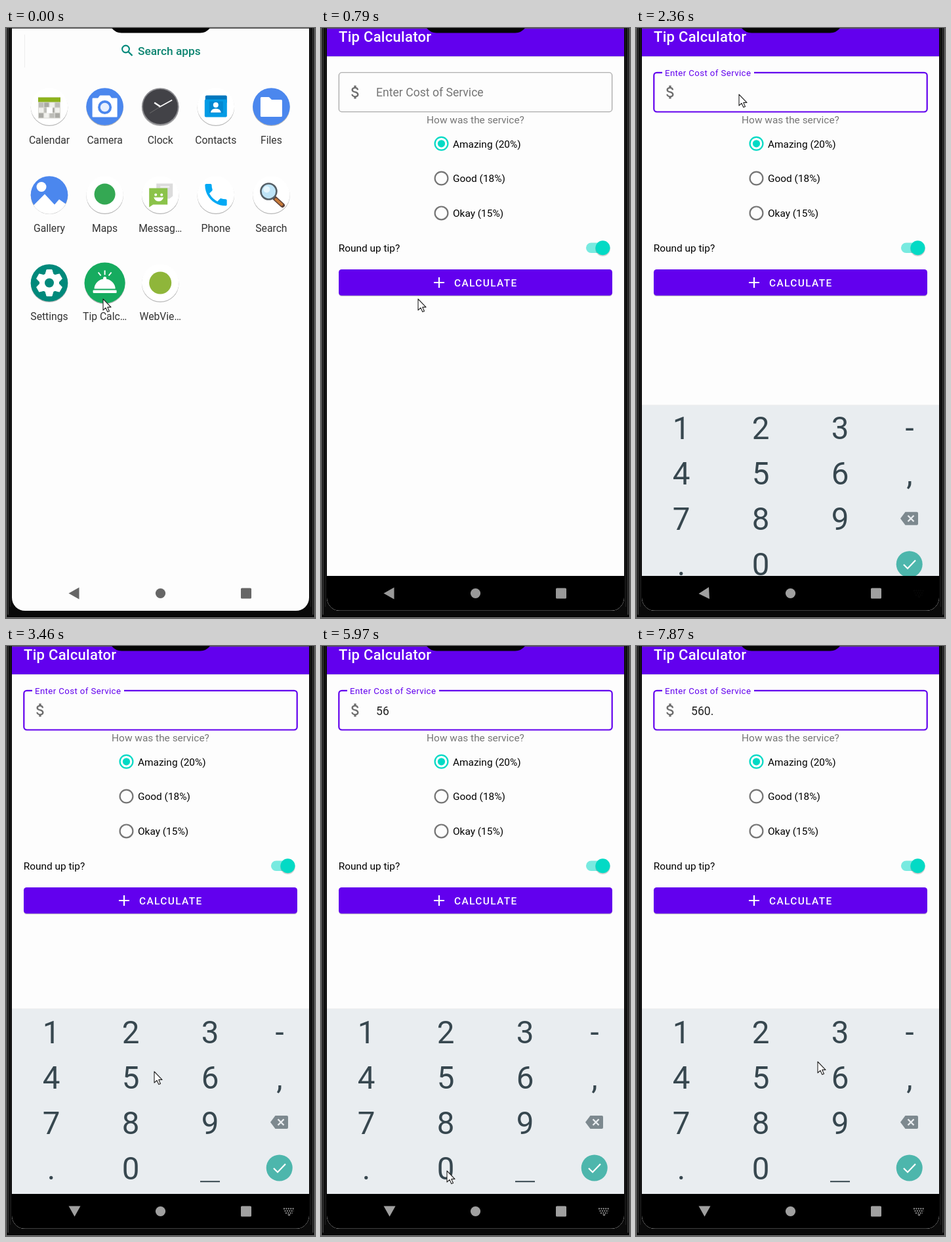
An HTML page that plays this animation: 471x897 px, repeating every 8 s.

```html
<!DOCTYPE html>
<html lang="en">
<head>
<meta charset="utf-8">
<title>Tip Calculator</title>
<style>
html, body { margin: 0; width: 100%; height: 100%; overflow: hidden; background: #0a0a0a; }
svg { display: block; width: 100%; height: 100%; font-family: Roboto, sans-serif; }
</style>
</head>
<body>
<svg id="stage" viewBox="0 0 471 897" xmlns="http://www.w3.org/2000/svg"></svg>
<script>
const LOOP = 8000, PURPLE = '#6200ee', TEAL = '#03dac5', GREY = '#757575', WHITE = '#fdfdfd';

// ---- markup helpers ----
const rect = (x, y, w, h, fill, rx = 0, more = '') =>
  `<rect x="${x}" y="${y}" width="${w}" height="${h}" fill="${fill}" rx="${rx}" ${more}/>`;
const disc = (x, y, r, fill, more = '') => `<circle cx="${x}" cy="${y}" r="${r}" fill="${fill}" ${more}/>`;
const path = (d, fill, more = '') => `<path d="${d}" fill="${fill}" ${more}/>`;
const line = (d, color, w, more = '') => path(d, 'none', `stroke="${color}" stroke-width="${w}" ${more}`);
const text = (x, y, size, fill, str, more = '') =>
  `<text x="${x}" y="${y}" font-size="${size}" fill="${fill}" ${more}>${str}</text>`;
const group = (id, body, more = '') => `<g id="${id}" ${more}>${body}</g>`;
const MID = 'text-anchor="middle"', MEDIUM = 'font-weight="500"';

// ---- launcher icons, drawn around 0,0 ----
const plate = (fill = '#fff', r = 28.3) => disc(0, 1.3, r, '#000', 'opacity=".28"') + disc(0, 0, r, fill);
const calendar = () => {
  let s = plate() + rect(-17, -14, 34, 32, '#d9d9d4') + rect(-17, -14, 34, 7, '#8db31c');
  for (let i = 0; i < 12; i++) {
    const x = i % 4, y = i >> 2;
    s += rect(-16 + x * 8.3, -6 + y * 8, 7, 7, ['#bdbdb8', '#f1f1ee', '#a9a9a4'][(x * 2 + y) % 3]);
  }
  return s + rect(-4, 1, 9, 9, '#fff');
};
const camera = () => plate('#4b87ee') + path('M-7-16H7L10-12H18V15H-18V-12H-10Z', '#fff',
  'stroke="#fff" stroke-width="2" stroke-linejoin="round"') + disc(0, 1, 10.5, '#4b87ee') + disc(0, 1, 6.8, '#e8f0fe');
const clock = () => plate('#8b8b8f') + disc(0, 0, 26.5, '#424247') +
  line('M-9-6L0 0', '#fff', 2.4) + line('M-2 1L18-10', '#fff', 1.7) + line('M0 0L-16 10', '#777', .8);
const contacts = () => plate() + rect(-16, -17, 33, 12, '#0277bd', 2) + rect(-17, -11, 34, 27, '#039be5', 2) +
  rect(-10, -8, 21, 18, '#0288d1', 1) + disc(0, -2.5, 4, '#fff') + path('M-8 9Q-7 3 0 3T8 9Z', '#fff');
const files = () => plate('#4b87ee') + path('M-15-13H-4L0-9H15V14H-15Z', '#fff',
  'stroke="#fff" stroke-width="3" stroke-linejoin="round"');
const gallery = () => plate('#4b87ee') + disc(-12, -12, 7.5, '#fff') +
  path('M-24 16L-7-1L8 15L15 7L25 14A28.3 28.3 0 0 1-24 16Z', '#fff');
const maps = () => plate() + disc(0, -1, 16, '#34a853');
const messages = () => plate() + path('M-6-17H19V2L14 6H-6Z', '#dcdcdc') + line('M0-12H14', '#f5f5f5', 2) +
  path('M-17-10H11V15H-11L-17 19Z', '#8bc34a') + disc(-7, 0, 2, '#fff') + disc(2, 0, 2, '#fff') +
  path('M-10 4H5Q3 10-2.5 10T-10 4Z', '#fff');
const phone = () => plate() + path('M6.6 10.8c1.4 2.8 3.8 5.1 6.6 6.6l2.2-2.2c.3-.3.7-.4 1-.2 1.1.4 2.3.6 3.6.6.5 0 1 .4 1 1V20c0 .6-.5 1-1 1C10.6 21 3 13.4 3 4c0-.6.5-1 1-1h3.5c.6 0 1 .4 1 1 0 1.2.2 2.4.6 3.6.1.3 0 .7-.3 1Z',
  '#03a9f4', 'transform="translate(-22 -22) scale(1.85)"');
const lens = () => plate() + line('M6 6L17 16', '#5d4037', 7, 'stroke-linecap="round"') +
  line('M7 7L16 15', '#c77b3b', 4, 'stroke-linecap="round"') +
  disc(-4, -5, 12, '#bfe4f7', 'stroke="#555f66" stroke-width="2.6"') + disc(-7, -8, 5, '#e6f6fd');
const gear = () => {
  let s = plate('#00897b');
  for (let a = 0; a < 360; a += 60) s += path('M-6-13L-4-20H4L6-13Z', '#fff', `transform="rotate(${a})" stroke="#fff" stroke-linejoin="round"`);
  return s + disc(0, 0, 15, '#fff') + disc(0, 0, 7, '#00897b');
};
const bell = () => plate('#16ab5f', 31) + path('M-16 9A16 15 0 0 1 16 9Z', '#fff') + rect(-18, 11, 36, 4.5, '#fff', 1) +
  disc(0, -7, 2.5, '#fff') + line('M0-12V-19M-6-11L-10-16M6-11L10-16', '#fff', 2);
const webview = () => plate() + disc(0, 0, 17, '#8fb63a');

const apps = [
  ['Calendar', calendar], ['Camera', camera], ['Clock', clock], ['Contacts', contacts], ['Files', files],
  ['Gallery', gallery], ['Maps', maps], ['Messag…', messages], ['Phone', phone], ['Search', lens],
  ['Settings', gear], ['Tip Calc…', bell], ['WebVie…', webview]
];

const navIcons = (color, backId) =>
  group(backId, path('M-9 0L7-9V9Z', color), 'transform="translate(104.5 859.5)"') +
  disc(235.5, 859.5, 7.6, color) + rect(358, 851.5, 16, 16, color, 1.6);

const launcher = () => line('M28.5 10V60', '#ececec', 1) +
  disc(182.5, 32, 5.4, 'none', 'stroke="#00897b" stroke-width="2.1"') + line('M186.4 36L192.5 42', '#00897b', 2.4) +
  text(201, 41, 17.3, '#0b8470', 'Search apps', MEDIUM) +
  apps.map(([name, icon], i) => {
    const x = 66 + i % 5 * 84.6, y = 119.5 + Math.floor(i / 5) * 134;
    return `<g transform="translate(${x} ${y})">${icon()}</g>` + text(x, y + 56.5, 15.7, '#333', name, MID);
  }).join('') + navIcons('#666', 'homeBack');

// ---- calculator app ----
const radio = (y, label, on) =>
  disc(183.5, y, 9.9, 'none', `stroke="${on ? TEAL : GREY}" stroke-width="2.2"`) +
  (on ? disc(183.5, y, 5.6, TEAL) : '') + text(201, y + 5.7, 15.43, '#000', label);

const form = () => rect(9, -45, 453, 931, WHITE) + rect(9, 43, 453, 1, '#000', 0, 'opacity=".1"') +
  rect(9, -19, 453, 62, PURPLE) +
  text(27, 20.7, 22.04, '#fff', 'Tip Calculator', MEDIUM + ' letter-spacing=".275"') +
  rect(27.3, 67.8, 416.4, 59.7, 'none', 4.4, 'id="box"') + rect(40, 64, 140, 8, WHITE, 0, 'id="gap"') +
  path('M11.8 10.9c-2.3-.6-3-1.2-3-2.2 0-1 1-1.8 2.7-1.8 1.8 0 2.4.9 2.5 2.1h2.2c-.1-1.7-1.1-3.3-3.2-3.8V3h-3v2.2c-1.9.4-3.5 1.6-3.5 3.6 0 2.3 1.9 3.4 4.7 4.1 2.5.6 3 1.5 3 2.4 0 .7-.5 1.8-2.7 1.8-2.1 0-2.9-.9-3-2.1H6.3c.1 2.2 1.8 3.4 3.7 3.8V21h3v-2.1c2-.4 3.5-1.5 3.5-3.6 0-2.8-2.4-3.8-4.7-4.4z',
    '#6e6e6e', 'transform="translate(39.3 84.3) scale(1.102)"') +
  text(84, 103.5, 17.63, GREY, 'Enter Cost of Service', 'id="hint"') +
  text(84, 104.5, 17.63, '#222', '', 'id="cost"') + rect(84, 86, 2, 23.5, PURPLE, 0, 'id="caret"') +
  text(235.5, 144.7, 15.43, GREY, 'How was the service?', MID) +
  radio(175.8, 'Amazing (20%)', true) + radio(228.5, 'Good (18%)') + radio(281.4, 'Okay (15%)') +
  text(26.7, 340, 15.43, '#000', 'Round up tip?') +
  rect(404, 326.5, 34, 15.4, '#78eae0', 7.7) + disc(429.5, 335.8, 11.3, '#000', 'opacity=".18"') + disc(429.5, 334.3, 11, TEAL) +
  rect(27, 368.5, 417, 39.5, '#000', 4.4, 'opacity=".2"') + rect(27, 367, 417, 39.7, PURPLE, 4.4) +
  line('M172 387H188M180 379V395', '#fff', 2.2) +
  text(203, 392.6, 15.43, '#fff', 'CALCULATE', MEDIUM + ' letter-spacing="1.38"');

// ---- number pad ----
const INK = '#37474f', colX = [69, 190, 311, 417];
const keyboard = () => rect(9, 551, 453, 1.5, '#000', 0, 'opacity=".06"') + rect(9, 552, 453, 281, '#e9edf0') +
  rect(0, 0, 113, 52, '#d1d5d8', 0, 'id="press"') +
  ['123-', '456,', '789', '.0'].map((row, r) => [...row].map((c, i) =>
    text(colX[i], 603.5 + r * 69, 47.5, INK, c, MID)).join('')).join('') +
  line('M296 814.2H326', INK, 2) +
  path('M403 724L410.5 714H428Q430 714 430 716V732Q430 734 428 734H410.5Z', '#7d898f') +
  line('M414.5 719.5L423.5 728.5M423.5 719.5L414.5 728.5', '#e9edf0', 2.4) +
  disc(416.7, 793.5, 20, '#4db6ac') + line('M408 794L414 800L426 787.5', '#fff', 2.2);

const imeIcon = () => [0, 1, 2].map(r => line(`M${423 + r * 1.5} ${855.5 + r * 3.3}H${440 - r * 1.5}`, '#999', 1.8, 'stroke-dasharray="2 1.4"')).join('') +
  path('M429 864H434L431.5 866.5Z', '#999');

const stage = document.getElementById('stage');
stage.innerHTML = `<defs>
  <clipPath id="screen">${rect(9, -30, 453, 916, '#fff', 20)}</clipPath>
  <clipPath id="win">${rect(9, -45.3, 453, 931, '#fff', 16, 'id="winRect"')}</clipPath>
  <clipPath id="pad">${rect(9, 0, 453, 833, '#fff')}</clipPath></defs>` +
  rect(0, 0, 471, 897, '#0a0a0a') + line('M.5 0V896.5H470.5V0', '#858585', 1) +
  line('M3 0V892M468 0V892', '#343434', 2) + line('M6.5 0V880M464.5 0V880', '#1c1c1c', 1.5) +
  `<g clip-path="url(#screen)">` + rect(9, 0, 453, 886, WHITE) + group('launcher', launcher()) +
  group('app', `<g clip-path="url(#win)">` + form() + rect(9, -19, 453, 852, '#fff', 0, 'id="veil"') +
    rect(9, -46, 453, 27.2, '#3700b3') +
    `<g clip-path="url(#pad)">${group('keys', keyboard())}</g>` + rect(9, 833, 453, 53, '#000') +
    group('nav', navIcons('#a0a0a0', 'appBack') + group('ime', imeIcon())) + '</g>') + '</g>' +
  line('M9 .5H462', '#555', 1) + path('M161 0Q167 7.5 176 7.5H296Q305 7.5 311 0Z', '#050505') +
  group('cursor', path('M0 0V17L4 13.4L6.8 19.6L9.5 18.4L6.8 12.4H12Z', '#fff', 'stroke="#222" stroke-width="1.1" stroke-linejoin="round"'));

const el = {};
stage.querySelectorAll('[id]').forEach(n => el[n.id] = n);
const set = (id, attrs) => { for (const k in attrs) el[id].setAttribute(k, attrs[k]); };
const show = (id, on) => set(id, { visibility: on ? 'visible' : 'hidden' });

// ---- motion ----
const lerp = (a, b, p) => a + (b - a) * p;
const span = (t, a, b) => Math.min(1, Math.max(0, (t - a) / (b - a)));
const smooth = p => p * p * (3 - 2 * p);

// bursts of screen updates: start, end, number of updates
const bursts = [[400, 1440, 9], [1690, 2630, 8], [2760, 3740, 8], [3990, 5000, 8], [5300, 6340, 8], [6490, 6880, 4], [7150, 7870, 6]];
function snap(t) {
  let out = 0;
  for (const [a, b, n] of bursts) {
    if (t < a) break;
    const d = (b - a) / (n - 1);
    out = Math.min(b, a + Math.floor((t - a + 12) / d) * d);
  }
  return out;
}

const track = [[0, 148, 412], [900, 148, 412], [1440, 157, 101], [2690, 157, 101], [3100, 256, 420], [3460, 226, 647],
  [3740, 190, 650], [4330, 190, 650], [4700, 304, 653], [5300, 304, 653], [5780, 192, 798], [6490, 192, 798],
  [6860, 77, 793], [7420, 77, 793], [7860, 277, 632]];
function pointer(t) {
  const i = track.findIndex(k => k[0] > t);
  if (i < 0) return track[track.length - 1].slice(1);
  const [a, b] = [track[i - 1], track[i]], p = smooth(span(t, a[0], b[0]));
  return [lerp(a[1], b[1], p), lerp(a[2], b[2], p)];
}

// key presses: down, up, character, column, row
const taps = [[3980, 4270, '5', 1, 1], [4950, 5290, '6', 2, 1], [5900, 6190, '0', 1, 3], [7140, 7290, '.', 0, 3]];

function draw(now) {
  const t = snap(now);

  // app window grows out of the launcher
  const s = t < 530 ? lerp(.35, .9067, span(t, 400, 530)) : lerp(.9067, 1, smooth(span(t, 530, 760)));
  show('app', t >= 400);
  set('app', { transform: `translate(${(1 - s) * 212.6} ${(1 - s) * 505}) scale(${s})` });
  set('winRect', { height: 931 - (1 - s) * 350 });
  set('veil', { opacity: t < 530 ? 1 : .2 * (1 - span(t, 530, 700)) });
  set('launcher', { opacity: t < 400 ? 1 : t < 520 ? .5 : 0 });
  set('nav', { opacity: span(t, 560, 800) });

  // text field
  const f = smooth(span(t, 1900, 2090)), focus = t > 1900;
  set('box', { stroke: focus ? PURPLE : '#9a9a9a', 'stroke-width': focus ? 2.2 : 1.1 });
  show('gap', focus);
  set('hint', { x: lerp(84, 44, f), y: lerp(103.5, 73, f), 'font-size': lerp(17.63, 13.23, f),
    'letter-spacing': .4 * f, fill: focus ? PURPLE : GREY });
  let typed = '', since = 1690, held = null;
  for (const k of taps) {
    if (t >= k[1]) { typed += k[2]; since = k[1]; }
    else if (t >= k[0]) held = k;
  }
  el.cost.textContent = typed;
  set('caret', { x: 84 + [...typed].reduce((w, c) => w + (c === '.' ? 4.6 : 9.9), 0) });
  show('caret', t >= 1690 && Math.floor((t - since) / 500) % 2 === 0);

  // number pad
  const k = 1 - (1 - span(t, 2000, 2500)) ** 2;
  show('keys', k > 0);
  set('keys', { transform: `translate(0 ${(1 - k) * 283})` });
  set('press', { x: held ? 13 + held[3] * 121 : 0, y: held ? 560 + held[4] * 69 : 0, opacity: held ? 1 : 0 });
  const turn = span(t, 2350, 2700);
  set('appBack', { transform: `translate(104.5 ${859.5 - turn}) rotate(${-90 * turn})` });
  set('ime', { opacity: span(t, 2350, 2600) });

  set('cursor', { transform: `translate(${pointer(t).join(' ')})` });
}

const begin = performance.now();
(function frame() {
  draw((performance.now() - begin) % LOOP);
  requestAnimationFrame(frame);
})();
</script>
</body>
</html>
```
